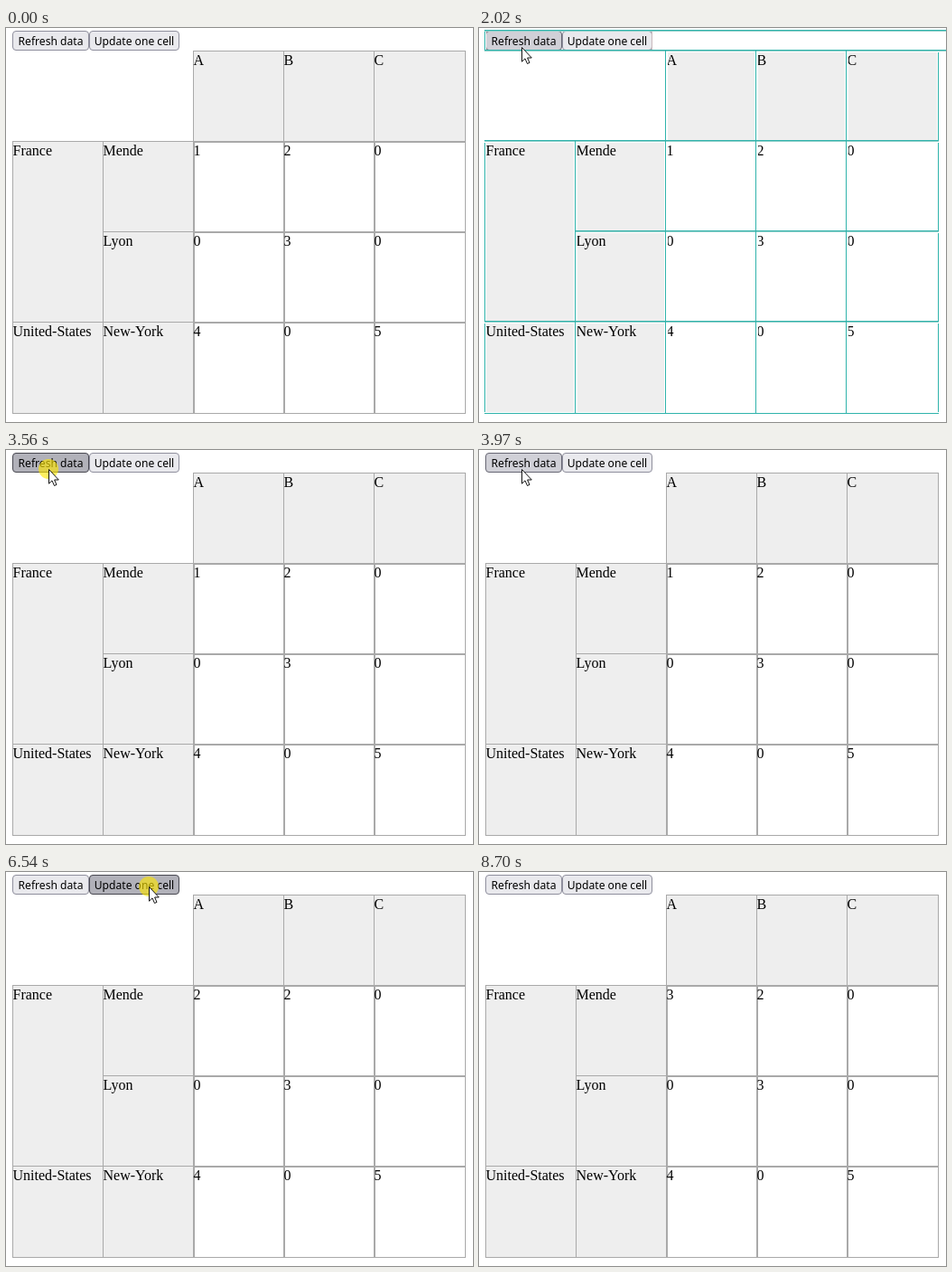
These frames come from a looping animation (517x436 px, 9500 ms). An HTML page:

```html
<!DOCTYPE html>
<html lang="en">
<head>
<meta charset="utf-8">
<title>Table refresh</title>
<style>
  html, body { margin: 0; width: 100%; height: 100%; overflow: hidden; background: #fff; }
  svg { display: block; width: 517px; height: 436px; }
  .cell { font: 16px "Liberation Serif", "Times New Roman", serif; }
  .label { font: 12.1px "Noto Sans", "Open Sans", sans-serif; text-anchor: middle; }
</style>
</head>
<body>
<svg id="stage" viewBox="0 0 517 436"></svg>
<script>
const LOOP = 9500;
const GRAY = '#a9a9a9', HEAD = '#eeeeee', TEAL = '#2fb3ab', PALE = '#93d0cb';
const stage = document.getElementById('stage');

function add(parent, tag, attrs, text) {
  const node = document.createElementNS('http://www.w3.org/2000/svg', tag);
  for (const name in attrs) node.setAttribute(name, attrs[name]);
  if (text !== undefined) node.textContent = text;
  parent.appendChild(node);
  return node;
}
const fillRect = (parent, x, y, width, height, fill) =>
  add(parent, 'rect', { x, y, width, height, fill });

// Bordered box whose outer pixels run from (x0, y0) to (x1, y1)
function box(x0, y0, x1, y1, fill) {
  add(stage, 'rect', { x: x0 + .5, y: y0 + .5, width: x1 - x0, height: y1 - y0, fill, stroke: GRAY });
}
const cellText = (x, y, text) =>
  add(stage, 'text', { x: x + .5, y: y + 16, class: 'cell' }, text);

const cols = [207, 307, 407, 508], rows = [125, 225, 325, 426];

// Buttons
function button(x, width, text) {
  const shape = add(stage, 'rect', { x: x + .5, y: 3.5, width: width - 1, height: 21, rx: 3.5, stroke: '#8f8f9d' });
  add(stage, 'text', { x: x + width / 2, y: 19, class: 'label' }, text);
  return { x, width, shape };
}
const buttons = [button(7, 85, 'Refresh data'), button(92, 100, 'Update one cell')];

// Table
for (let c = 0; c < 3; c++) box(cols[c], 25, cols[c + 1], 125, HEAD);
box(7, 125, 107, 325, HEAD);
box(7, 325, 107, 426, HEAD);
for (let r = 0; r < 3; r++) {
  box(107, rows[r], 207, rows[r + 1], HEAD);
  for (let c = 0; c < 3; c++) box(cols[c] + 1, rows[r] + 1, cols[c + 1], rows[r + 1], '#fff');
}
['A', 'B', 'C'].forEach((name, c) => cellText(cols[c], 25, name));
cellText(7, 125, 'France');
cellText(7, 325, 'United-States');
['Mende', 'Lyon', 'New-York'].forEach((name, r) => cellText(107, rows[r], name));
const values = [[1, 2, 0], [0, 3, 0], [4, 0, 5]].map((row, r) =>
  row.map((value, c) => cellText(cols[c], rows[r], value)));

// Repaint outlines
const flash = add(stage, 'g', {});
function vertical(x, y0, y1) {
  fillRect(flash, x - 1, y0, 4, y1 - y0, '#fff');
  fillRect(flash, x, y0, 1, y1 - y0, TEAL);
}
function horizontal(y, x0, x1) {
  fillRect(flash, x0, y, x1 - x0, 3, '#fff');
  fillRect(flash, x0, y, x1 - x0, 1, TEAL);
  fillRect(flash, x0, y + 1, x1 - x0, 1, PALE);
}
fillRect(flash, 7, 3, 1, 22, '#fff');
fillRect(flash, 191, 3, 1, 22, '#c9b9bd');
[206, 306, 406].forEach(x => vertical(x, 24, 427));
vertical(106, 124, 427);
fillRect(flash, 7, 125, 1, 302, '#fff');
fillRect(flash, 507, 25, 2, 402, '#fff');
fillRect(flash, 508, 24, 1, 403, TEAL);
fillRect(flash, 6, 2, 1, 23, TEAL);
fillRect(flash, 6, 124, 1, 303, TEAL);
fillRect(flash, 6, 2, 511, 1, TEAL);
fillRect(flash, 6, 3, 511, 1, PALE);
horizontal(24, 6, 517);
horizontal(124, 6, 509);
horizontal(224, 106, 509);
horizontal(324, 6, 509);
fillRect(flash, 6, 425, 503, 1, '#fff');
fillRect(flash, 6, 426, 503, 1, TEAL);
// Crossings stay crisp
[206, 306, 406].forEach(x => fillRect(flash, x, 24, 1, 403, TEAL));
fillRect(flash, 106, 124, 1, 303, TEAL);

// Pointer
const halo = add(stage, 'circle', { r: 11, fill: '#ffe600', 'fill-opacity': .62 });
const pointer = add(stage, 'path', {
  d: 'M.5 .5V16.2L4 12.9L6.5 18.5L9 17.4L6.6 12H11.3Z',
  fill: '#fff', stroke: '#111', 'stroke-width': 1
});

// Moves advance in n even steps, the first at start and the last at end
const moves = [
  { start: 330, end: 680, n: 6, from: [410, 450], to: [269, 165] },
  { start: 1010, end: 1420, n: 7, from: [269, 165], to: [47, 21] },
  { start: 4370, end: 5200, n: 13, from: [47, 21], via: [95, 121], to: [158, 15.5] },
  { start: 7800, end: 8010, n: 4, from: [158, 15.5], to: [409, 306] },
  { start: 8340, end: 8700, n: 6, from: [409, 306], to: [489, 440] }
];
const presses = [[1820, 2020], [2680, 2890], [3560, 3760], [5670, 5870], [6540, 6800]];
const flashes = [[1950, 2220], [2820, 3090], [3760, 3970], [5870, 6140], [6740, 7070]];
const during = (spans, t) => spans.some(([a, b]) => t >= a && t < b);
const ease = u => u * u * (3 - 2 * u);

function pointerAt(t) {
  const move = moves.filter(m => t >= m.start).pop();
  if (!move || t >= 8700) return null;
  const { start, end, n, from, to, via } = move;
  const step = Math.floor((t - start) / (end - start) * (n - 1) + 1.001);
  const u = ease(Math.min(step, n) / n);
  return from.map((a, i) => {
    const mid = via ? via[i] : (a + to[i]) / 2;
    return Math.round((1 - u) ** 2 * a + 2 * u * (1 - u) * mid + u * u * to[i]);
  });
}

const show = (node, on) => node.setAttribute('visibility', on ? 'visible' : 'hidden');

function draw(t) {
  const tip = pointerAt(t), pressed = during(presses, t);
  show(pointer, tip);
  show(halo, pressed);
  show(flash, during(flashes, t));
  if (tip) {
    pointer.setAttribute('transform', `translate(${tip})`);
    halo.setAttribute('cx', tip[0]);
    halo.setAttribute('cy', tip[1]);
  }
  for (const { x, width, shape } of buttons) {
    const over = tip && tip[0] >= x && tip[0] < x + width && tip[1] >= 3 && tip[1] < 25;
    shape.setAttribute('fill', !over ? '#e9e9ed' : pressed ? '#b1b1b9' : '#d0d0d7');
    shape.setAttribute('stroke', !over ? '#8f8f9d' : pressed ? '#484851' : '#676774');
  }
  values[0][0].textContent = t < 5870 ? 1 : t < 6740 ? 2 : 3;
}

const began = performance.now();
function tick() {
  draw((performance.now() - began) % LOOP);
  requestAnimationFrame(tick);
}
tick();
</script>
</body>
</html>
```
